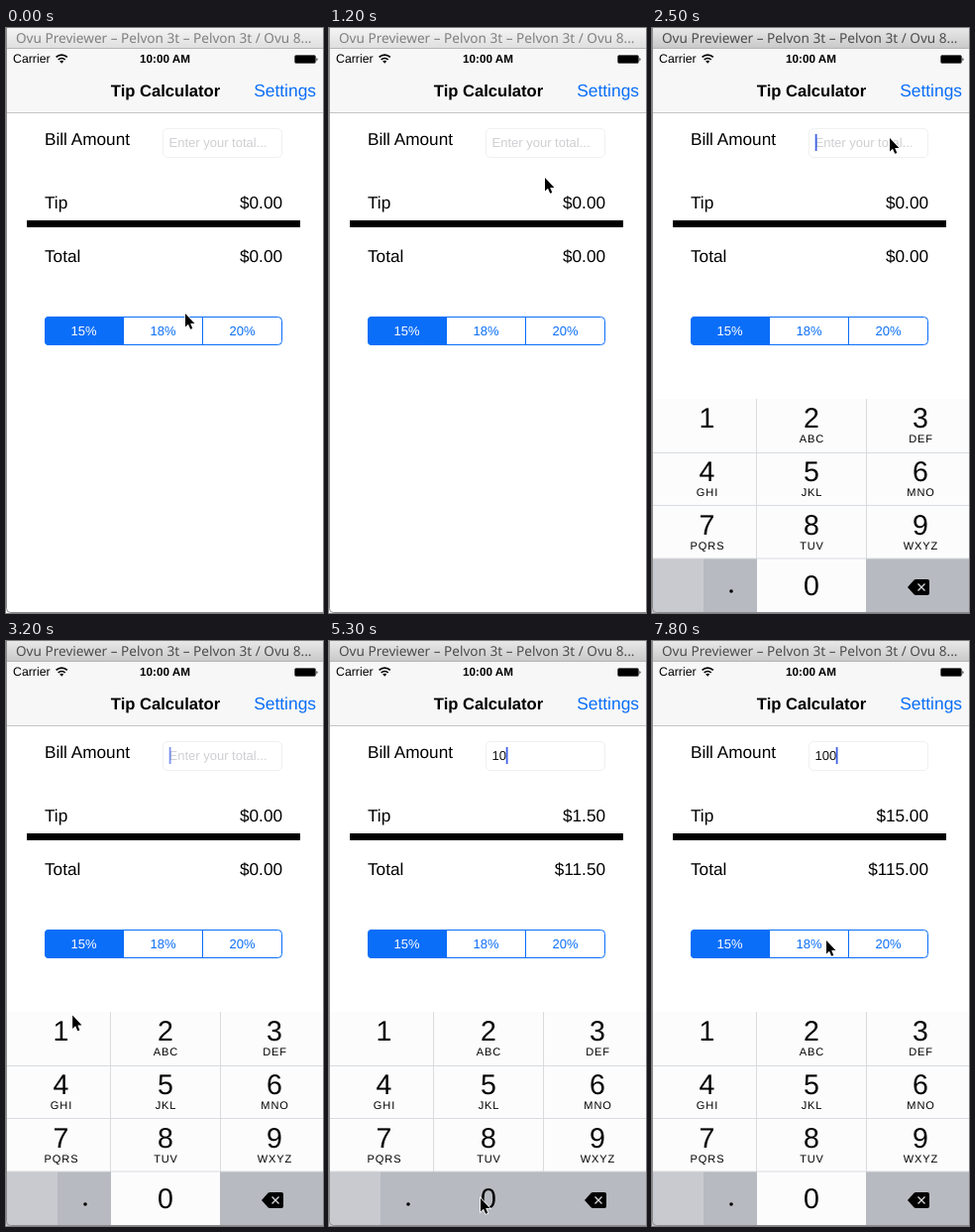
An HTML page for the animation above (8000 ms loop, 320x590 px).

```html
<!DOCTYPE html>
<html lang="en">
<head>
<meta charset="utf-8">
<title>Tip Calculator</title>
<style>
  html, body { margin: 0; height: 100%; overflow: hidden; background: #fff; }
  svg { display: block; width: 320px; height: 590px; font: 17.2px "Liberation Sans", Arial, sans-serif; text-rendering: geometricPrecision; }
  .window { font: 13.6px "Noto Sans", sans-serif; }
  .status { font-size: 12.3px; }
  .clock { font-size: 11.7px; font-weight: bold; }
  .heading { font-size: 16.6px; font-weight: bold; }
  .small { font-size: 13px; }
  .digit { font-size: 28.5px; }
  .letters { font-size: 11px; letter-spacing: .9px; }
  .mid { text-anchor: middle; }
  .end { text-anchor: end; }
  .blue { fill: #0a6ef8; }
  .outline { stroke: #0a6ef8; }
</style>
</head>
<body>
<svg viewBox="0 0 320 590">
  <defs>
    <linearGradient id="chrome" x2="0" y2="1">
      <stop id="chromeTop" stop-color="#f4f4f4"/>
      <stop id="chromeEnd" offset="1" stop-color="#dedede"/>
    </linearGradient>
  </defs>
  <rect width="320" height="590" fill="#fff"/>

  <rect y="21" width="320" height="64.5" fill="#f7f7f7"/>
  <rect y="85" width="320" height="1" fill="#c4c4c4"/>
  <text class="status" x="7" y="35">Carrier</text>
  <g fill="none" stroke="#000" stroke-width="1.7">
    <path d="M50.6 29.4a8 8 0 0 1 11.2 0M52.7 32a5 5 0 0 1 7 0"/>
    <path d="M56.2 35.8l-2-2.2a3 3 0 0 1 4 0z" fill="#000" stroke="none"/>
  </g>
  <text class="clock mid" x="160.5" y="35">10:00 AM</text>
  <rect x="291.5" y="27.5" width="21" height="8" rx="1.5" fill="#000" stroke="#555" stroke-width=".8"/>
  <path d="M313.5 30q2 1.5 0 3.4z"/>
  <text class="heading mid" x="161" y="69">Tip Calculator</text>
  <text class="blue end" x="313" y="69" font-size="17.4">Settings</text>

  <text x="39" y="118">Bill Amount</text>
  <rect x="158.5" y="101.5" width="120" height="29" rx="4.5" fill="#fff" stroke="#f0f0f0"/>
  <text id="field" class="small" x="164.5" y="120"></text>
  <rect id="caret" y="107" width="1.8" height="17" fill="#4060e8"/>
  <text x="39" y="182">Tip</text>
  <text id="tip" class="end" x="279" y="182"></text>
  <rect x="21" y="194" width="276" height="7"/>
  <text x="39" y="236">Total</text>
  <text id="total" class="end" x="279" y="236"></text>

  <rect class="outline" x="39.5" y="291.5" width="239" height="28" rx="4" fill="#fff"/>
  <path class="blue" d="M119 291H43a4 4 0 0 0-4 4v21a4 4 0 0 0 4 4h76z"/>
  <path class="outline" d="M198.5 291v29"/>
  <g class="small mid">
    <text x="78.5" y="310" fill="#fff">15%</text>
    <text x="158.5" y="310" class="blue">18%</text>
    <text x="238.5" y="310" class="blue">20%</text>
  </g>

  <g id="keyboard">
    <rect y="374" width="320" height="216" fill="#fcfcfd"/>
    <rect y="535" width="106" height="55" fill="#b7bac0"/>
    <rect y="535" width="52" height="55" fill="#c8cad0"/>
    <rect x="216" y="535" width="104" height="55" fill="#b7bac0"/>
    <rect id="press1" y="374" width="105" height="54" fill="#b3b6ba"/>
    <rect id="press0" x="106" y="535" width="110" height="55" fill="#b7bac0"/>
    <path d="M0 428.5H320M0 481.5H320M0 535H320M105.5 374V535M216.5 374V535" stroke="#d9dbdf"/>
    <g id="keys" class="mid"></g>
    <circle cx="80" cy="568" r="1.8"/>
    <path d="M258 564l6.5-7.2q.8-.8 2-.8h11.5q2 0 2 2v12q0 2-2 2h-11.5q-1.2 0-2-.8z"/>
    <path d="M268.5 560.5l7 7m0-7l-7 7" stroke="#d5d7da" stroke-width="1.4"/>
  </g>

  <rect width="320" height="21" fill="url(#chrome)"/>
  <rect y="20" width="320" height="1" fill="#b5b5b5"/>
  <text id="window" class="window" x="10" y="15">Ovu Previewer – Pelvon 3t – Pelvon 3t / Ovu 8...</text>
  <path d="M.5 0V585.5q0 4 4 4H320" fill="none" stroke="#8c8c8c"/>
  <path id="cursor" d="M0 0V13.5L3 10.700 5.200 15.800 7.300 15 5.200 10H9.400z" stroke="#fff" stroke-width="1.500" paint-order="stroke"/>
</svg>
<script>
const $ = id => document.getElementById(id);
const LOOP = 8000;

$('keys').innerHTML = ['1', '2ABC', '3DEF', '4GHI', '5JKL', '6MNO', '7PQRS', '8TUV', '9WXYZ', '', '0']
  .map((key, i) => {
    const x = [55.5, 161, 271][i % 3], y = 403 + 54 * Math.floor(i / 3) + (key === '0' ? 7 : 0);
    return `<text class="digit" x="${x}" y="${y}">${key.slice(0, 1)}</text>
      <text class="letters" x="${x + .5}" y="${y + 15}">${key.slice(1)}</text>`;
  }).join('');

// time, x, y of the pointer tip
const path = [
  [0, 181, 288], [100, 181, 288], [900, 197, 216], [1200, 218, 151], [1500, 240, 111],
  [2600, 240, 111], [3000, 88, 335], [3300, 60, 392], [4400, 60, 392], [5100, 153, 562],
  [6100, 153, 562], [6800, 184, 308], [7000, 184, 308], [7400, 176, 302], [LOOP, 176, 302]
];
const bills = [[0, ''], [4200, '1'], [5300, '10'], [5800, '100']];
const caretStarts = [2250, 4200, 5300, 5800];

const clamp = v => Math.max(0, Math.min(1, v));
const between = (t, from, to) => t >= from && t < to;
const show = (id, on) => $(id).setAttribute('opacity', +on);
const money = v => '$' + v.toFixed(2);

function pointer(t) {
  const i = path.findIndex(p => p[0] > t);
  const [t0, x0, y0] = path[i - 1], [t1, x1, y1] = path[i];
  const k = (t - t0) / (t1 - t0), e = k * k * (3 - 2 * k);
  return [x0 + (x1 - x0) * e, y0 + (y1 - y0) * e];
}

function caretOpacity(t) {
  const start = caretStarts.filter(s => s <= t).pop();
  if (start === undefined) return 0;
  const p = (t - start) % 1000;
  return p < 700 ? clamp((600 - p) / 200) : clamp((p - 850) / 150);
}

function draw(t) {
  const bill = bills.filter(b => b[0] <= t).pop()[1];
  $('field').textContent = bill || 'Enter your total...';
  $('field').setAttribute('fill', bill ? '#111' : '#cfcfd3');
  $('tip').textContent = money(bill * .15);
  $('total').textContent = money(bill * 1.15);

  $('caret').setAttribute('x', 164.7 + bill.length * 7);
  show('caret', caretOpacity(t));

  const active = t >= 1800;
  $('window').setAttribute('fill', active ? '#4c4c4c' : '#808080');
  $('chromeTop').setAttribute('stop-color', active ? '#e8e8e8' : '#f4f4f4');
  $('chromeEnd').setAttribute('stop-color', active ? '#c8c8c8' : '#dedede');

  const hidden = (1 - clamp((t - 2100) / 400)) ** 3;
  $('keyboard').setAttribute('transform', `translate(0 ${216 * hidden})`);
  show('press1', between(t, 4100, 4200));
  show('press0', between(t, 5200, 5400) || between(t, 5700, 5800));

  $('cursor').setAttribute('transform', `translate(${pointer(t)})`);
}

function tick() {
  draw(performance.now() % LOOP);
  requestAnimationFrame(tick);
}
tick();
</script>
</body>
</html>
```
